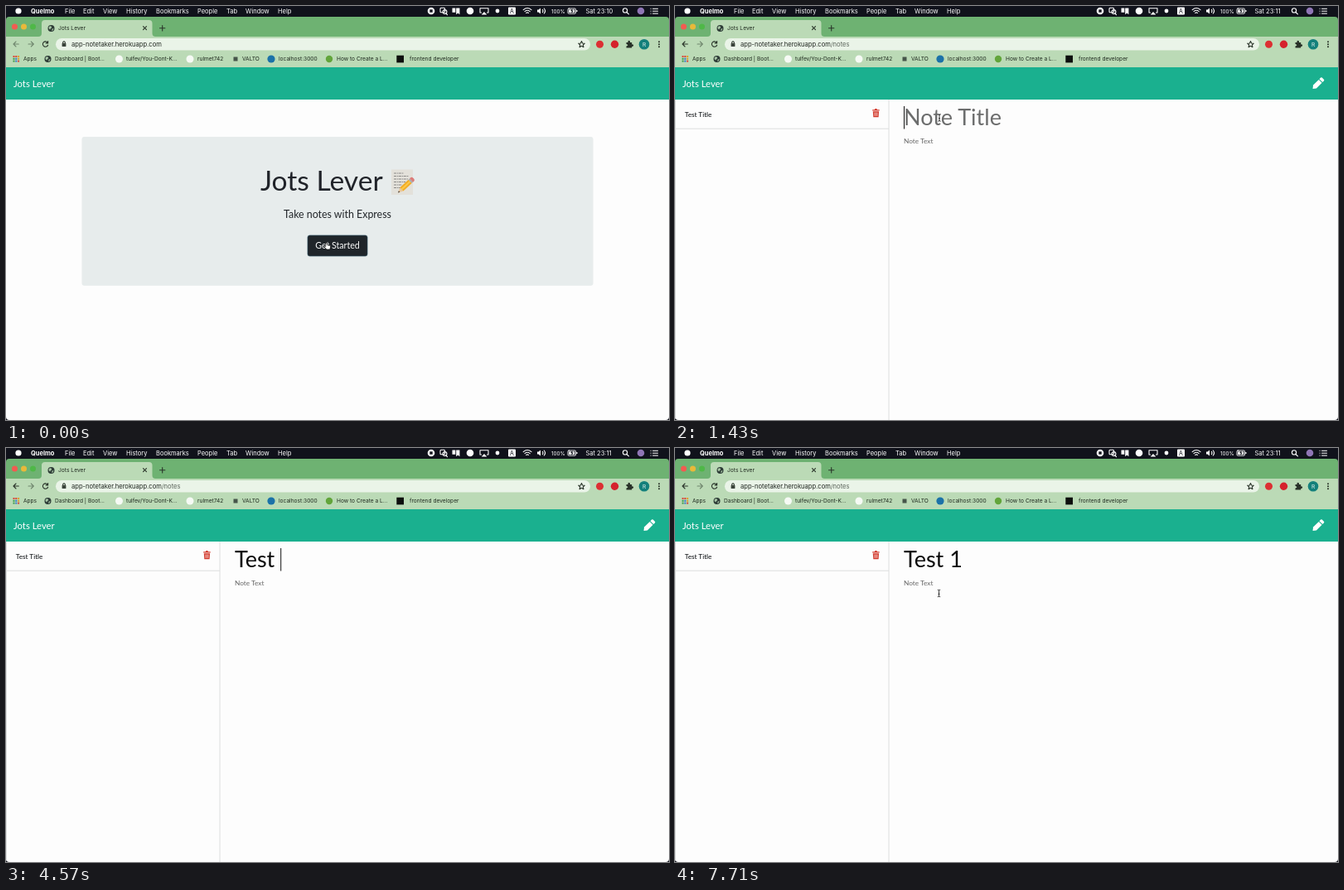
An HTML page that plays this animation: 800 px wide and 500 px high, repeating every 8 s.

```html
<!DOCTYPE html>
<html lang="en">
<head>
<meta charset="utf-8">
<title>Jots Lever</title>
<style>
html, body { margin: 0; width: 100%; height: 100%; overflow: hidden; background: #10121b; }
svg { display: block; }
text { white-space: pre; font-family: Inter, "Open Sans", sans-serif; }
.menu text { font-size: 7.5px; fill: #fff; }
.marks text { font-size: 6.6px; fill: #1d281d; }
.page text { font-family: Lato, "Open Sans", sans-serif; }
.line { fill: none; stroke-width: 1.1; stroke-linecap: round; stroke-linejoin: round; }
.dark { stroke: #2a352a; }
.white { stroke: #fff; }
</style>
</head>
<body>
<svg width="800" height="500" viewBox="0 0 800 500">
  <defs>
    <clipPath id="window"><rect y="13" width="800" height="487" rx="4"/></clipPath>
    <linearGradient id="fade"><stop stop-color="#bbdab6" stop-opacity="0"/><stop offset="1" stop-color="#bbdab6"/></linearGradient>
    <g id="globe">
      <circle r="4" fill="#2c3a35"/>
      <path d="M-3-1.5Q-1-3.5 0-2.4L.8-.9-.8.2-1.2 1.5-2.6.6ZM1.3.2L3 .6 1.9 2.5.6 3Z" fill="#a9c8a7"/>
    </g>
  </defs>

  <rect width="800" height="500" fill="#10121b"/>

  <g class="menu">
    <circle cx="15" cy="6" r="3.6" fill="#fff"/>
    <g id="menuItems"></g>
    <circle cx="513" cy="6" r="4.3" fill="#fff"/><rect x="511.3" y="4.3" width="3.4" height="3.4" fill="#10121b"/>
    <g class="line white">
      <rect x="524" y="2.3" width="5.5" height="5.5" rx="1"/><circle cx="529.5" cy="7" r="2.4"/><path d="M531 9l1.5 1.6"/>
      <path d="M573.5 8H572V2.8h10V8h-1.5"/>
      <path d="M624.2 4.6q4.9-4.2 9.8 0M626 6.6q3.1-2.6 6.2 0M627.7 8.4q1.4-1.1 2.8 0"/>
      <path d="M647.4 4.3q1.5 1.7 0 3.4M649.3 3q2.5 3 0 6"/>
      <circle cx="747" cy="5.4" r="2.6"/><path d="M749 7.5l2.4 2.4"/>
      <path d="M778 3.3h.2M780.5 3.3h6M778 6.2h.2M780.5 6.2h6M778 9.1h.2M780.5 9.1h6" stroke-width="1"/>
      <rect x="678" y="3" width="9.5" height="6.2" rx="1.2" stroke-width=".9"/>
    </g>
    <path d="M538.5 2.5h3.8v5.2h-3.8ZM543.2 2.5h4.2v7.8l-2.1-1.7-2.1 1.7ZM573.7 10.4l3.3-3.4 3.3 3.4ZM641 4.6h1.6L645 2.4v7.2l-2.4-2.2H641Z" fill="#fff"/>
    <circle cx="560" cy="6" r="4.3" fill="#fff"/>
    <circle cx="593" cy="6" r="2.4" fill="#fff"/>
    <rect x="606" y="1.6" width="9" height="9" rx="1" fill="#fff"/>
    <text x="608" y="8.7" style="fill:#10121b;font-size:7px">A</text>
    <path d="M679.2 4.2h7v3.8h-7ZM688.3 5h1.2v2h-1.2Z" fill="#fff"/>
    <path d="M683.5 2.8l-2.4 3.5h1.7l-.6 3 2.6-3.7h-1.7Z" fill="#10121b"/>
    <circle cx="766" cy="6" r="4.3" fill="#8f76b5"/>
  </g>

  <g clip-path="url(#window)">
    <rect y="13" width="800" height="61" fill="#6eb272"/>
    <path d="M0 37H39Q43 37 43 33V21Q43 17 47 17H172.500Q176.500 17 176.500 21V33Q176.500 37 180.500 37H800V74H0Z" fill="#bbdab6"/>
    <circle cx="10.500" cy="25" r="3.500" fill="#f25b51"/>
    <circle cx="21.500" cy="25" r="3.500" fill="#e9b93a"/>
    <circle cx="32.500" cy="25" r="3.500" fill="#4fb848"/>
    <use id="favicon" href="#globe" x="54.500" y="27"/>
    <g id="spinner">
      <circle cx="55" cy="27" r="4.300" fill="#bbdab6"/>
      <use href="#globe" transform="translate(55 27) scale(.65)"/>
      <path id="arc" class="line" d="M0-4A4 4 0 0 1 4 0" stroke="#427bb5"/>
    </g>
    <text id="tabTitle" x="63" y="29.200" font-size="6.700" fill="#202b20"/>
    <rect x="145" y="19" width="16" height="16" fill="url(#fade)"/>
    <rect x="160.500" y="19" width="15" height="16" fill="#bbdab6"/>
    <path class="line dark" d="M165.500 24.700l4 4m0-4l-4 4M185.500 26.700h6.400M188.700 23.500v6.400"/>

    <rect x="60" y="39" width="645" height="14.500" rx="7.200" fill="#eaf4e8"/>
    <path id="back" class="line" d="M15.300 46H9m3-3l-3 3 3 3"/>
    <path class="line" stroke="#71886f" d="M27 46h6.300m-3-3l3 3-3 3"/>
    <path id="reload" class="line dark" d="M50.200 44.200A3.200 3.200 0 1 0 50.600 47.200M50.600 42.500v2.400h-2.400"/>
    <path id="stop" class="line dark" d="M44.800 43.200l5.600 5.600m0-5.600l-5.600 5.600"/>
    <rect x="67.600" y="45" width="4.800" height="4" rx=".6" fill="#3b443b"/>
    <path class="line dark" d="M68.700 45v-1.200q1.300-2 2.600 0V45" stroke-width=".9"/>
    <text x="79" y="49" font-size="7.600" fill="#202620">app-notetaker.herokuapp.com<tspan id="path" fill="#5c655c">/notes</tspan></text>
    <path class="line dark" stroke-width=".9" d="M694.500 42.500l1.100 2.500 2.700.2-2 1.800.6 2.700-2.400-1.400-2.400 1.400.6-2.700-2-1.800 2.700-.2Z"/>
    <circle cx="716.500" cy="46.300" r="4.500" fill="#dc2f32"/>
    <circle cx="734.500" cy="46.300" r="4.700" fill="#d5222c"/>
    <path d="M748.500 44h2q-.5-2.300 1.200-2.300T753 44h2.200v2.200q2 0 2 1.400t-2 1.300v1.600h-6.700v-2q1.800-.3 1.800-1.300t-1.800-1.200Z" fill="#283128"/>
    <circle cx="770" cy="46.300" r="6.300" fill="#13807b"/>
    <text x="770" y="48.700" font-size="6.600" fill="#e8f4f0" text-anchor="middle">R</text>
    <g fill="#283128"><circle cx="788" cy="43.300" r="1"/><circle cx="788" cy="46.300" r="1"/><circle cx="788" cy="49.300" r="1"/></g>

    <g class="marks">
      <g id="appsGrid"></g>
      <use href="#globe" x="50.500" y="64"/>
      <circle cx="136.500" cy="64" r="4.500" fill="#f6faf5"/>
      <circle cx="222" cy="64" r="4.500" fill="#f6faf5"/>
      <rect x="274.500" y="61.500" width="5" height="5" fill="#46554a"/>
      <circle cx="320" cy="64" r="4.600" fill="#1b72a8"/>
      <circle cx="390" cy="64" r="4.200" fill="#62a53b"/>
      <rect x="471.300" y="59.700" width="8.700" height="8.700" fill="#0c0f0d"/>
      <g id="bookmarks"></g>
    </g>

    <g class="page">
      <rect y="74" width="800" height="426" fill="#fdfdfd"/>
      <rect y="74" width="800" height="39" fill="#1ab08f"/>
      <text x="9" y="97.700" font-size="11.300" fill="#fff">Jots Lever</text>

      <g id="home">
        <rect x="91.500" y="158" width="617" height="179.700" rx="3" fill="#e7ecec"/>
        <text x="307" y="223.300" font-size="33.600" fill="#202329">Jots Lever</text>
        <g id="memo">
          <rect x="465" y="197.500" width="26" height="30.500" fill="#e3e1da"/>
          <path d="M468 202h12M468 205.500h18M468 209h17M468 212.500h14M468 216h10M468 219.500h8" stroke="#8a8987" stroke-width="1" stroke-dasharray="3 .8 1.500 .6"/>
          <g transform="translate(473 225.500) rotate(-43)">
            <path d="M0 0L6-3V3Z" fill="#e9c79b"/><path d="M0 0L2.200-1.100V1.100Z" fill="#443a35"/>
            <path d="M6-3H20V3H6Z" fill="#f2ac24"/><path d="M6-1H20V1H6Z" fill="#fbc94b"/>
            <path d="M20-3h2v6h-2Z" fill="#a9adb0"/><path d="M22-3h1.500q2 0 2 3t-2 3H22Z" fill="#dd7b78"/>
          </g>
        </g>
        <text x="400" y="255.800" font-size="12.400" fill="#212529" text-anchor="middle">Take notes with Express</text>
        <rect id="ring" x="362.300" y="275.300" width="75.400" height="28.200" rx="3.500" fill="#8b959c"/>
        <rect x="364" y="277" width="72" height="25" rx="2.500" fill="#20252a" stroke="#2c4c5c" stroke-width=".7"/>
        <text x="400" y="293.400" font-size="10.600" fill="#fff" text-anchor="middle">Get Started</text>
      </g>

      <g id="notes">
        <path d="M.5 113V500M258 113V500M0 148.200H258" stroke="#dcdede" fill="none"/>
        <text x="11.800" y="134" font-size="8.200" font-weight="500" fill="#15181b">Test Title</text>
        <g id="icons">
          <path d="M238.200 125.300h2.600l.6-1.200h2l.6 1.200h2.700v1.300h-8.500ZM238.800 127.300h7.300l-.5 6.900h-6.300Z" fill="#d33c2f"/>
          <path d="M240.800 128.500v4.400M242.450 128.500v4.400M244.100 128.500v4.400" stroke="#fbe7e4" stroke-width=".7"/>
          <g transform="translate(769.500 100) rotate(-45)" fill="#fff">
            <path d="M0 0L3.500-2.700H13V2.700H3.500Z"/><path d="M14-2.700h2.300q1.200 0 1.200 1.200v3q0 1.200-1.200 1.200H14Z"/>
          </g>
        </g>
        <text id="noteTitle" x="276" y="144" font-size="27"/>
        <text x="276" y="166" font-size="8.300" fill="#666">Note Text</text>
        <rect id="titleCaret" y="121" width="1" height="27.500" fill="#111"/>
        <rect id="textCaret" x="276" y="158" width=".9" height="10" fill="#111"/>
      </g>
    </g>

    <g id="status">
      <path d="M0 488H142.500Q145.500 488 145.500 491V500H0Z" fill="#70b274" stroke="#4b7f50" stroke-width=".8"/>
      <text x="2" y="496.700" font-size="6.600" fill="#14210f">https://app-notetaker.herokuapp.com/notes</text>
    </g>
    <path id="hand" d="M-1.500-4q1-.8 1.400.3L.4-1.300l3 .6q1 .3.7 1.700L3.300 4H-.6L-3.600.7q-.2-1.200 1-.8l.8.6Z" fill="#fff" stroke="#111" stroke-width=".7"/>
    <g id="beam" fill="none">
      <path d="M-1.600-4.300Q0-4.300 0-3V3Q0 4.300-1.600 4.300M1.600-4.300Q0-4.300 0-3M0 3Q0 4.300 1.600 4.300M-1 .8H1" stroke="#fff" stroke-width="1.800" opacity=".6"/>
      <path d="M-1.600-4.300Q0-4.300 0-3V3Q0 4.300-1.600 4.300M1.600-4.300Q0-4.300 0-3M0 3Q0 4.300 1.600 4.300M-1 .8H1" stroke="#222" stroke-width=".9"/>
    </g>
  </g>
</svg>

<script>
const LOOP = 8000;
const el = id => document.getElementById(id);
const show = (id, on) => el(id).style.display = on ? '' : 'none';
const SVG = 'http://www.w3.org/2000/svg';

function add(parent, tag, attrs, content = '') {
  const node = document.createElementNS(SVG, tag);
  for (const name in attrs) node.setAttribute(name, attrs[name]);
  node.textContent = content;
  el(parent).append(node);
  return node;
}

[['File', 71], ['Edit', 93], ['View', 117], ['History', 145], ['Bookmarks', 181], ['People', 231],
 ['Tab', 266], ['Window', 289], ['Help', 328]].forEach(([label, x]) => add('menuItems', 'text', { x, y: 9 }, label));
add('menuItems', 'text', { x: 30, y: 9, 'font-weight': 700 }, 'Quelmo');
add('menuItems', 'text', { x: 658, y: 8.6, style: 'font-size:6.3px' }, '100%');
const clock = add('menuItems', 'text', { x: 699.5, y: 9 });

[['Apps', 21], ['Dashboard | Boot...', 59], ['tulfev/You-Dont-K...', 145], ['rulmet742', 231], ['VALTO', 285],
 ['localhost:3000', 329], ['How to Create a L...', 399], ['frontend developer', 487]]
  .forEach(([label, x]) => add('bookmarks', 'text', { x, y: 66.3 }, label));

const gridColors = ['#d9483b', '#d9483b', '#e0a02c', '#3f9a4c', '#3a78c9', '#e0a02c', '#3f9a4c', '#3a78c9', '#d9483b'];
gridColors.forEach((fill, i) =>
  add('appsGrid', 'rect', { x: 8.5 + i % 3 * 2.8, y: 60 + Math.floor(i / 3) * 2.8, width: 2, height: 2, fill }));

// Each step changes only the listed parts of the scene.
const steps = [
  [0, { time: '23:10', page: 'home', tab: 'Jots Lever', path: false, loading: false, status: false, ring: false,
        icons: false, title: '', titleCaret: false, textCaret: false, pointer: 'hand', at: [387.5, 290] }],
  [140, { status: true }],
  [290, { time: '23:11' }],
  [430, { ring: true }],
  [570, { loading: true, path: true, tab: 'https://app-notetaker.herokuapp.com' }],
  [860, { page: 'notes', tab: 'Jots Lever', pointer: 'beam', at: [364.5, 237] }],
  [1000, { icons: true, at: [338, 176] }],
  [1140, { loading: false, status: false, at: [319, 135] }],
  [1290, { titleCaret: true }],
  [1860, { titleCaret: false }],
  [2290, { titleCaret: true }],
  [2710, { title: 'T', pointer: '' }],
  [2860, { title: 'Te' }],
  [3140, { title: 'Tea' }],
  [3570, { titleCaret: false }],
  [4000, { title: 'Te', titleCaret: true }],
  [4140, { title: 'Tes' }],
  [4290, { title: 'Test ' }],
  [4710, { titleCaret: false }],
  [5000, { titleCaret: true }],
  [5290, { title: 'Test 1' }],
  [5860, { pointer: 'beam', at: [318.5, 137] }],
  [6000, { titleCaret: false, at: [318.5, 160] }],
  [6140, { textCaret: true, at: [318.5, 181] }],
  [6290, { at: [318.5, 175.5] }],
  [6570, { textCaret: false }],
  [7140, { textCaret: true }],
  [7570, { textCaret: false }]
];
let scene = {};
const scenes = steps.map(([start, change]) => ({ start, ...(scene = { ...scene, ...change }) }));

function draw(s) {
  clock.textContent = 'Sat ' + s.time;
  el('tabTitle').textContent = s.tab;
  el('back').setAttribute('stroke', s.path ? '#2a352a' : '#71886f');
  el('noteTitle').textContent = s.title || 'Note Title';
  el('noteTitle').setAttribute('fill', s.title ? '#0b0b0b' : '#6c6d6d');
  for (const id of ['path', 'status', 'ring', 'icons', 'titleCaret', 'textCaret']) show(id, s[id]);
  for (const id of ['home', 'notes']) show(id, s.page === id);
  for (const id of ['spinner', 'stop']) show(id, s.loading);
  for (const id of ['favicon', 'reload']) show(id, !s.loading);
  for (const id of ['hand', 'beam']) {
    show(id, s.pointer === id);
    el(id).setAttribute('transform', `translate(${s.at})`);
  }
  const typed = s.title ? el('noteTitle').getComputedTextLength() : 0;
  el('titleCaret').setAttribute('x', 276 + typed);
}

let current;
function tick() {
  const t = performance.now() % LOOP;
  const next = scenes.findLast(s => s.start <= t);
  if (next !== current) draw(current = next);
  const turn = Math.floor(t / 143) * 75;
  el('arc').setAttribute('transform', `translate(55 27) rotate(${turn})`);
  requestAnimationFrame(tick);
}
tick();
</script>
</body>
</html>
```
